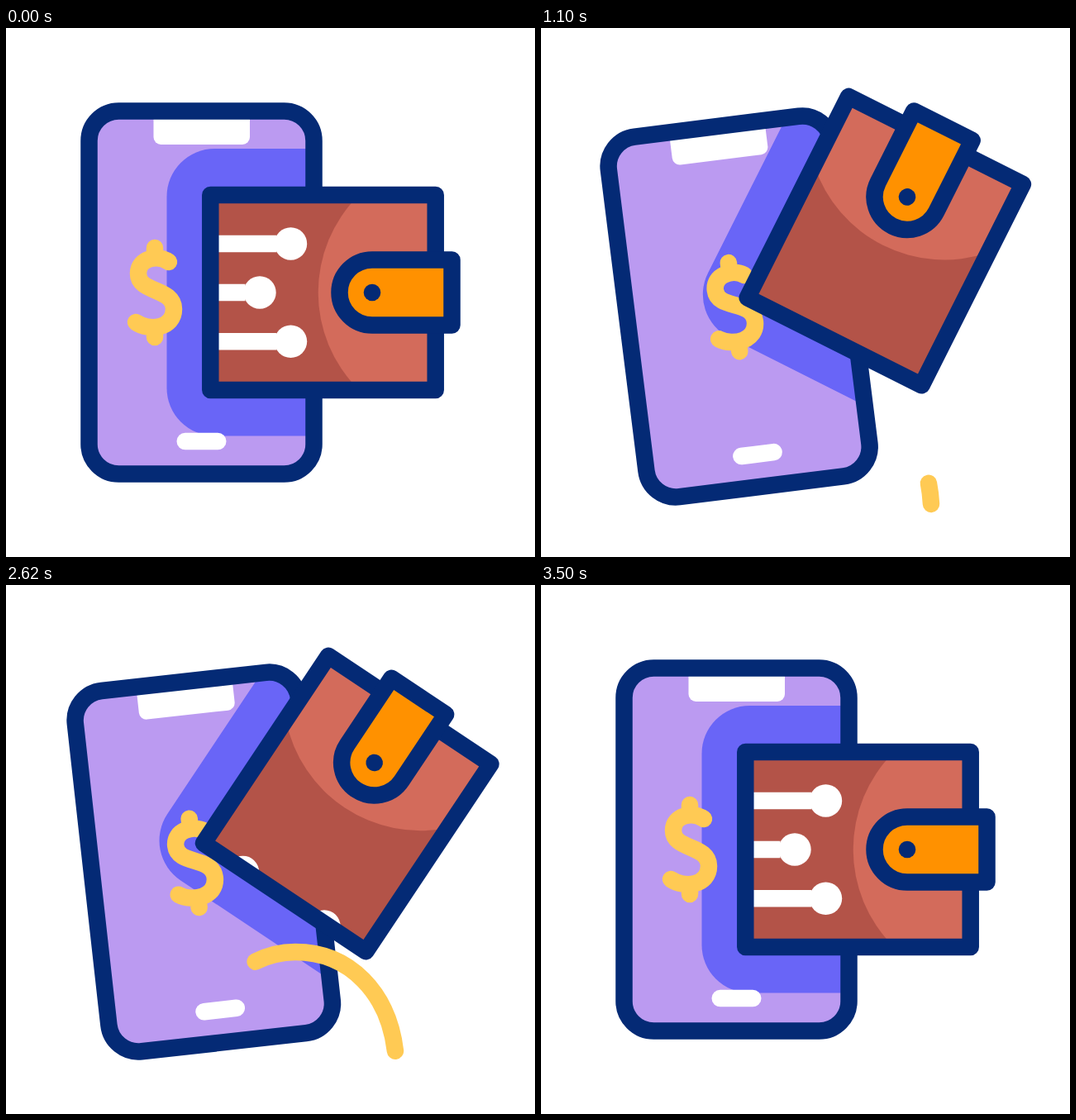
Recreate the animation shown at these times as an HTML page. Size 640 px wide and 640 px high, loop 3600 ms.

```html
<!DOCTYPE html>
<html lang="en">
<head>
<meta charset="utf-8">
<title>Phone wallet</title>
<style>
  html, body { margin: 0; width: 100%; height: 100%; overflow: hidden; background: #fff; }
  svg { display: block; width: 100vw; height: 100vh; }
  .line { fill: none; stroke: #042a75; stroke-width: 20.5; stroke-linejoin: round; }
  .gold { fill: none; stroke: #ffca54; stroke-width: 20.5; stroke-linecap: round; stroke-linejoin: round; }
  .white { fill: #fff; }
  .pin { fill: #fff; stroke: none; }
  .pin path { stroke: #fff; stroke-width: 20.5; }
</style>
</head>
<body>
<svg viewBox="0 0 640 640">
  <defs>
    <clipPath id="screen"><rect x="-136" y="-219.5" width="272" height="439" rx="36"/></clipPath>
    <clipPath id="leather"><rect x="-128" y="-110" width="256" height="220"/></clipPath>
  </defs>

  <g id="phone">
    <g clip-path="url(#screen)">
      <rect x="-140" y="-224" width="280" height="448" fill="#bb9af1"/>
      <rect id="shade" x="-189" y="-174" width="500" height="347.5" rx="58" fill="#6965f7"/>
      <rect class="white" x="-58" y="-230" width="116.5" height="51" rx="9"/>
      <rect class="white" x="-30" y="169.7" width="60" height="20.6" rx="10.3"/>
    </g>
    <path id="dollar" class="gold" d="M17 -37C4 -46 -20 -42 -20 -23C-20 1 23 -6 23 20C23 44 -7 47 -23 36M0 -54V-43M0 43V54"/>
    <rect class="line" x="-136" y="-219.5" width="272" height="439" rx="36"/>
  </g>

  <path id="swoosh" class="gold" pathLength="1"
    d="M58 376C62 450 128 490 205 490C250 490 270 476 286 465C305 452 325 444 350 444C420 444 468 500 472 576"/>

  <g id="wallet">
    <g clip-path="url(#leather)">
      <rect x="-130" y="-112" width="260" height="224" fill="#b35348"/>
      <circle cx="160" r="165.8" fill="#d36b5b"/>
      <g class="pin"><path d="M-150 -59H-56"/><circle cx="-39" cy="-59" r="19.7"/></g>
      <g class="pin"><path d="M-150 0H-94"/><circle cx="-76.5" r="19.7"/></g>
      <g class="pin"><path d="M-150 59.3H-56"/><circle cx="-39" cy="59.3" r="19.7"/></g>
    </g>
    <rect class="line" x="-136.2" y="-118" width="272.4" height="236"/>
    <path class="line" style="fill:#ff9100" d="M156 -39.5H59.5a39.5 39.5 0 0 0 0 79H156Z"/>
    <circle cx="59.5" r="10.3" fill="#042a75"/>
  </g>
</svg>
<script>
const LOOP = 3600;
const $ = id => document.getElementById(id);
const [phone, shade, dollar, swoosh, wallet] = ['phone', 'shade', 'dollar', 'swoosh', 'wallet'].map($);
const pins = [...document.querySelectorAll('.pin')];
const pinTravel = [126, 94, 126];

const progress = (t, from, to) => Math.min(1, Math.max(0, (t - from) / (to - from)));
const smooth = x => x * x * (3 - 2 * x);

// Same curve as cubic-bezier(a, 0, b, 1)
function ease(x, a, b) {
  let lo = 0, hi = 1;
  for (let i = 0; i < 30; i++) {
    const s = (lo + hi) / 2, r = 1 - s;
    if (3 * a * s * r * r + 3 * b * s * s * r + s * s * s < x) lo = s; else hi = s;
  }
  return smooth(lo);
}

const move = (el, value) => el.setAttribute('transform', value);

// Visible stretch of the swoosh as fractions of its length
function trim(t) {
  return t < 1700
    ? [smooth(progress(t, 700, 1160)), smooth(progress(t, 500, 1080))]
    : [1 - smooth(progress(t, 2380, 2900)), 1 - smooth(progress(t, 2570, 3150))];
}

function draw(t) {
  const p = t < 1700
    ? ease(progress(t, 60, 1540), 0.76, 0.32)
    : 1 - ease(progress(t, 1760, 3500), 0.97, 0.24);

  const px = 236.5 + 3.5 * p, py = 320 + 19 * p, tilt = -8 * p;
  const walletPose = `translate(${383.5 + 36.8 * p} ${320 - 70 * p}) rotate(${-71 * p})`;

  move(phone, `translate(${px} ${py}) rotate(${tilt})`);
  move(wallet, walletPose);
  move(shade, `rotate(${-tilt}) translate(${-px} ${-py}) ${walletPose}`);
  move(dollar, `translate(${-56.5 * (1 - p)} 0)`);
  pins.forEach((pin, i) => move(pin, `translate(${-pinTravel[i] * p} 0)`));

  const [from, to] = trim(t), len = to - from;
  swoosh.style.display = len > 0.0005 ? '' : 'none';
  swoosh.setAttribute('stroke-dasharray', `${len} 3`);
  swoosh.setAttribute('stroke-dashoffset', -from);
}

const start = performance.now();
function tick() {
  draw((performance.now() - start) % LOOP);
  requestAnimationFrame(tick);
}
tick();
</script>
</body>
</html>
```
